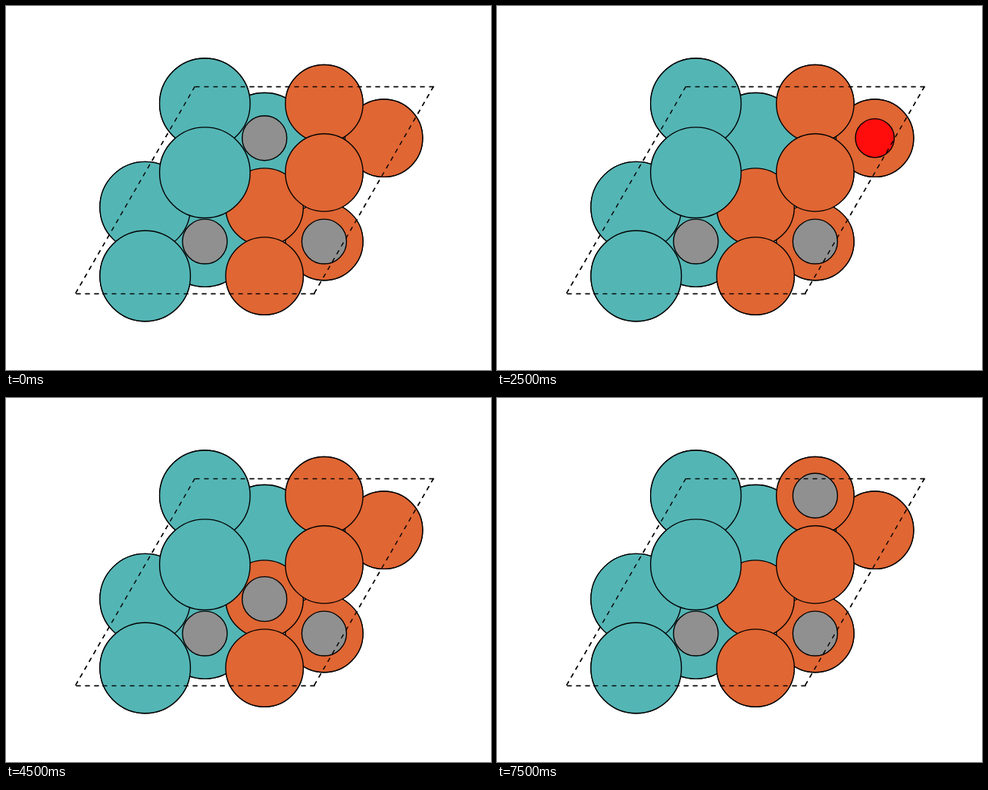
Write an HTML page with a canvas that moves like this. It is 640 px wide and 480 px high and loops after 8000 ms.

```html
<!DOCTYPE html>
<html lang="en">
<head>
<meta charset="utf-8">
<title>Adsorption sites on a two-metal surface</title>
<style>
  html, body { margin: 0; width: 100%; height: 100%; overflow: hidden; background: #fff; }
  canvas { display: block; }
</style>
</head>
<body>
<canvas id="stage" width="640" height="480"></canvas>
<script>
const ctx = document.getElementById('stage').getContext('2d');

const STEP = 500;
const A = 496 / 1.05 / 3;           // surface lattice constant in px
const SCALE = A / (2.87 * Math.SQRT2); // px per angstrom
const H = A * Math.sqrt(3) / 2;
const MID_X = 328, MID_Y = 242.4;
const LINE = 100 / 72;

const ELEMENTS = {
  Mo: { r: 1.54, color: '#54b5b5' },
  Fe: { r: 1.32, color: '#e06633' },
  C: { r: 0.76, color: '#909090' },
  N: { r: 0.71, color: '#3050f8' },
  O: { r: 0.66, color: '#ff0d0d' }
};

// Grid of half-cells across, thirds of a row down
const X0 = MID_X - 1.5 * A + A / 2 + A / 12;
const Y0 = MID_Y - H * 5 / 6;
const at = (col, row) => ({ x: X0 + col * A / 2, y: Y0 + row * H / 3 });

// Columns and rows of the left pair in each layer, deepest first
const LAYERS = [
  [[2, 1], [1, 4]],
  [[1, 0], [0, 3]],
  [[1, 2], [0, 5]]
];
const FIXED = [[1, 4], [3, 4]];
const SITES = [[2, 1], [4, 1], [0, 3], [2, 3], [1, 0], [3, 0]];
const KINDS = ['C', 'N', 'O'];

function atom(kind, [col, row]) {
  const p = at(col, row), e = ELEMENTS[kind];
  ctx.beginPath();
  ctx.arc(p.x, p.y, e.r * SCALE, 0, 2 * Math.PI);
  ctx.fillStyle = e.color;
  ctx.fill();
  ctx.stroke();
}

function slab() {
  for (const layer of LAYERS) {
    for (const [col, row] of layer) {
      atom('Mo', [col, row]);
      atom('Fe', [col + 2, row]);
    }
  }
}

const snap = v => Math.floor(v + 0.5) + 0.5;

function dashes(x, y, dx, dy) {
  const units = 4 * 27 - 2;
  const fit = dy === 0 ? snap : v => v;
  for (let k = 0; k < units; k += 4) {
    const a = k / units, b = (k + 2) / units;
    ctx.beginPath();
    ctx.moveTo(fit(x + dx * a), fit(y + dy * a));
    ctx.lineTo(fit(x + dx * b), fit(y + dy * b));
    ctx.stroke();
  }
}

function cell() {
  const left = MID_X - 1.5 * A, top = MID_Y - H, bottom = MID_Y + H;
  dashes(left, bottom, 2 * A, 0);
  dashes(left + A, top, 2 * A, 0);
  dashes(left, bottom, A, -2 * H);
  dashes(left + 2 * A, bottom, A, -2 * H);
}

function draw(t) {
  const step = Math.floor(t / STEP) % 16;
  ctx.fillStyle = '#fff';
  ctx.fillRect(0, 0, 640, 480);
  ctx.strokeStyle = '#000';
  ctx.lineWidth = LINE;
  // Lower cell face and a repeat of the layers lie beneath the surface
  cell();
  slab();
  slab();
  for (const site of FIXED) atom('C', site);
  atom(KINDS[step % 3], SITES[Math.floor(step / 3)]);
  cell();
}

const start = performance.now();
function frame() {
  draw(performance.now() - start);
  requestAnimationFrame(frame);
}
frame();
</script>
</body>
</html>
```
